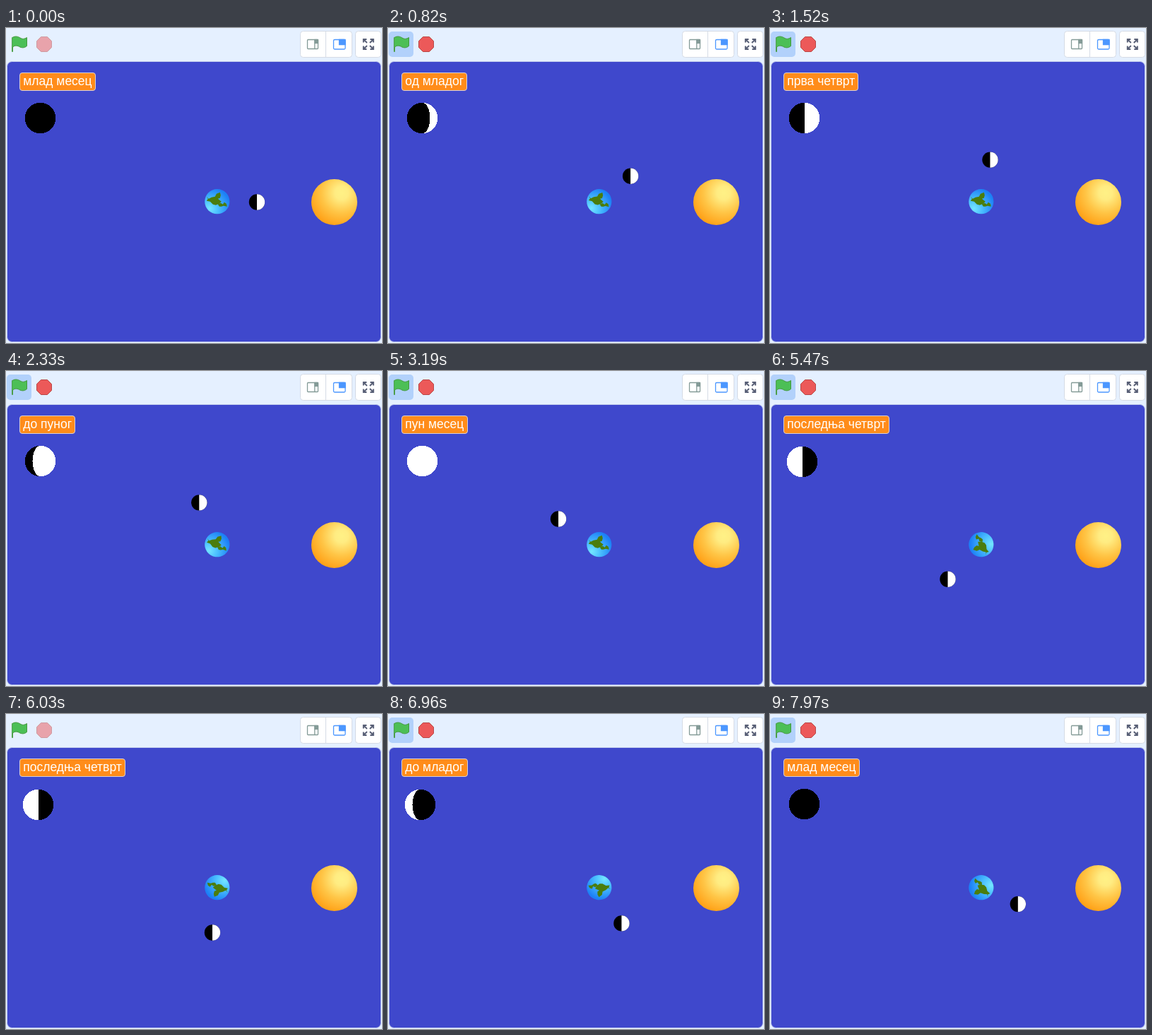
Animation, 532 px wide and 446 px high, one loop 8 s. Source, as an HTML page:

```html
<!DOCTYPE html>
<html lang="sr">
<head>
<meta charset="utf-8">
<style>
  html, body { margin: 0; width: 100%; height: 100%; overflow: hidden; background: #e5f0ff; }
  svg { position: absolute; left: 0; top: 0; }
  #label {
    position: absolute; left: 19px; top: 63px; height: 26px; box-sizing: border-box;
    padding: 0 4.3px; border: 1px solid #d9cfd8; border-radius: 4px; background: #ff8c1a;
    color: #fff; font: 17.5px/23px "Liberation Sans", Arial, sans-serif; white-space: nowrap;
  }
</style>
</head>
<body>
<svg width="532" height="446" viewBox="0 0 532 446">
  <defs>
    <radialGradient id="sunFill" cx=".66" cy=".3" r=".72">
      <stop offset="0" stop-color="#fff186"/>
      <stop offset=".2" stop-color="#ffec82"/>
      <stop offset=".6" stop-color="#ffc546"/>
      <stop offset="1" stop-color="#ffa31a"/>
    </radialGradient>
    <radialGradient id="seaFill" cx=".2" cy=".78" r=".85">
      <stop offset="0" stop-color="#74e6ff"/>
      <stop offset=".4" stop-color="#4cc0ff"/>
      <stop offset="1" stop-color="#1c80f6"/>
    </radialGradient>
  </defs>

  <!-- toolbar -->
  <rect id="pressed" x="1" y="5" width="35" height="36" rx="5" fill="#b2d1fb"/>
  <path d="M9 13.5C13 11 17 12 20 14Q24.500 17 29.500 13.500V25.500C26 28.500 22 28.500 18.500 26.200Q13.500 23.500 9.500 27V33.500H8.700V13.500Z"
        fill="#4cbf56" stroke="#45993d" stroke-linejoin="round"/>
  <path id="stop" d="M49.500 12.500H58.500L64.500 18.500V27.500L58.500 33.500H49.500L43.500 27.500V18.500Z"
        fill="#ec5959" stroke="#b84848" stroke-linejoin="round"/>
  <g fill="#fff" stroke="#d5dbe5">
    <rect x="416.500" y="4.500" width="73" height="37" rx="4"/>
    <path d="M452.500 5V41"/>
    <rect x="494.500" y="4.500" width="36" height="37" rx="4"/>
  </g>
  <g fill="none" stroke="#849b97" stroke-width="1.300">
    <rect x="426.500" y="16.500" width="15" height="13" rx="1"/>
    <path d="M436.800 17V29"/>
    <rect x="437" y="16.500" width="4.500" height="5" fill="#849b97"/>
  </g>
  <g fill="none" stroke="#4c97ff" stroke-width="1.300">
    <rect x="463.500" y="16.500" width="16.500" height="13.500" rx="1.500"/>
    <path d="M471.500 16.500H480V23.500H471.500Z" fill="#4c97ff"/>
  </g>
  <g id="arrows" fill="none" stroke="#575e75" stroke-width="2"></g>

  <!-- stage -->
  <rect x="1.500" y="47.500" width="529" height="397" rx="7" fill="#3f48cc" stroke="#c3cdec"/>
  <circle cx="464.500" cy="246.500" r="32.500" fill="url(#sunFill)"/>
  <g id="earth">
    <circle r="17.600" fill="url(#seaFill)"/>
    <path fill="#4b7d0c" d="M-15-7L-12-4L-8-6L-3-7L-1-11L4-13L5-9L4-5L1-4L6 0L3 3L-2 5L-6 4L-10 0L-15-1L-13-4Z
      M1 4L5 2L8 4L10 1L13 3L14 7L9 6L6 7L3 7Z"/>
  </g>
  <g id="moon">
    <circle r="11.200"/>
    <path d="M0-11.200A11.200 11.200 0 0 1 0 11.200Z" fill="#fff"/>
  </g>
  <g id="phase" shape-rendering="crispEdges">
    <circle r="21.700"/>
    <path id="lit" fill="#fff"/>
  </g>
</svg>
<div id="label"></div>

<script>
const $ = id => document.getElementById(id);
const LOOP = 8000, PART = 45;
const NAMES = ['млад месец', 'од младог', 'прва четврт', 'до пуног',
               'пун месец', 'од пуног', 'последња четврт', 'до младог'];
// start, end, number of steps, degrees turned by the first step
const RUNS = [
  [500, 910, 6, 8], [1280, 1830, 8, 9], [2250, 2640, 6, 8], [3190, 3680, 7, 9],
  [4140, 4620, 7, 6], [5470, 6030, 8, 5], [6580, 7040, 7, 8], [7820, 8270, 7, 10]
];

$('arrows').innerHTML = [0, 90, 180, 270].map(a =>
  `<path transform="translate(512.800 23) rotate(${a})" d="M2 -2L6.500 -6.500M2.500 -7H7V-2.500"/>`).join('');

// Lit part of the disc for the first half of the cycle; the second half is the same turned around.
function litPath(step) {
  const r = 21.7, bulge = [r, 11, 0, 11, r][step];
  return step ? `M0 ${-r}A${r} ${r} 0 0 1 0 ${r}A${bulge} ${r} 0 0 ${step > 2 ? 1 : 0} 0 ${-r}Z` : '';
}

function stateAt(t) {
  const i = RUNS.findLastIndex(run => t >= run[0]);
  if (i < 0) return { phase: 0, angle: 0, running: false };
  const [start, end, steps, first] = RUNS[i];
  const k = Math.floor((t - start) / (end - start) * (steps - 1) + 1e-6);
  const turned = first + (PART - first) * Math.min(1, k / (steps - 2));
  return { phase: (i + 1) % 8, angle: i * PART + turned, running: k < steps - 1 };
}

function draw(now) {
  const { phase, angle, running } = stateAt(now % LOOP);
  const rad = angle * Math.PI / 180, waning = phase > 4;
  $('pressed').style.display = running ? '' : 'none';
  $('stop').style.opacity = running ? 1 : 0.5;
  $('moon').setAttribute('transform',
    `translate(${292 + 63 * Math.cos(rad)} ${246.5 - 63 * Math.sin(rad)})`);
  $('earth').setAttribute('transform', `translate(298.800 245.700) rotate(${-10 * angle})`);
  $('phase').setAttribute('transform',
    waning ? 'translate(45.500 128.500) rotate(180)' : 'translate(48.500 127.500)');
  $('lit').setAttribute('d', litPath(waning ? 8 - phase : phase));
  $('label').textContent = NAMES[phase];
}

const begin = performance.now();
function tick() {
  draw(performance.now() - begin);
  requestAnimationFrame(tick);
}
tick();
</script>
</body>
</html>
```
